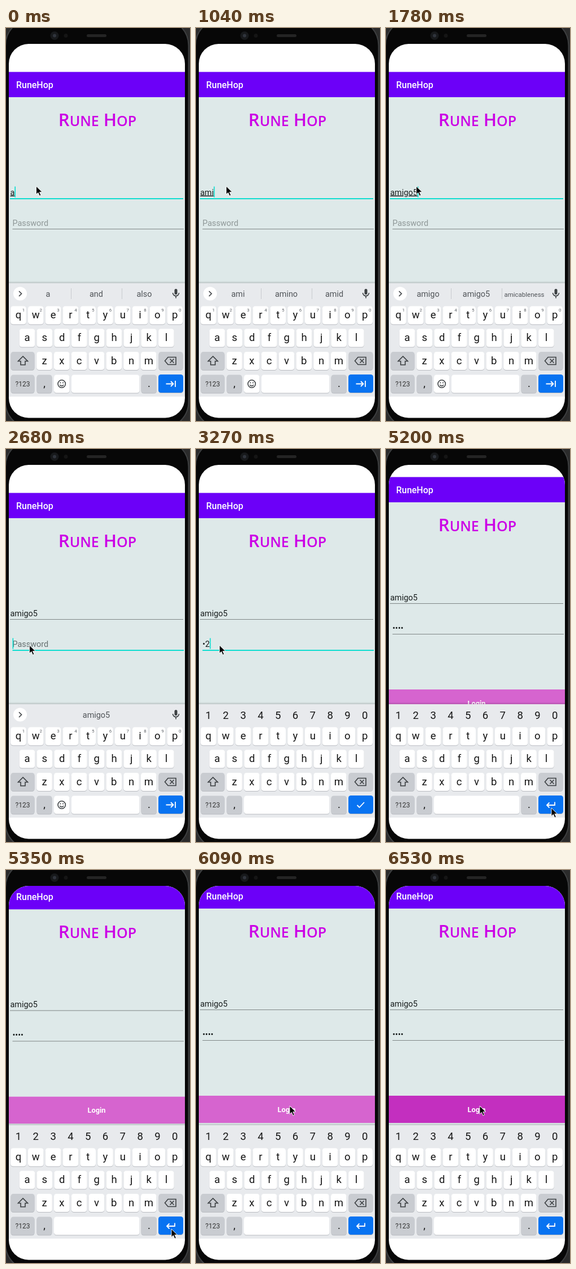
Animation of 326 by 693 pixels, one loop 8000 ms. Source, as an HTML page:

```html
<!DOCTYPE html>
<html lang="en">
<head>
<meta charset="utf-8">
<title>Phone login</title>
<style>
html, body { margin: 0; width: 100%; height: 100%; overflow: hidden; background: #2b2b2b; }
svg { display: block; width: 100%; height: 100%; }
text { font-family: Roboto, sans-serif; white-space: pre; }
.mid { text-anchor: middle; }
.field { font-size: 14.4px; fill: #161b1b; }
.key { font-size: 18.5px; fill: #151515; }
.hint { font-size: 8px; fill: #5f6368; }
.sug { font-size: 14.4px; fill: #505458; }
.title { font: 600 31px "Open Sans", sans-serif; fill: #cc00e6; }
.title .small { font-size: 25px; }
.icon { fill: none; stroke: #3c4043; stroke-width: 1.6; }
.white { stroke: #fff; stroke-width: 1.8; }
</style>
</head>
<body>
<svg viewBox="0 0 326 693">
  <defs>
    <clipPath id="screen"><rect x="5" y="28" width="312" height="659.500" rx="35"/></clipPath>
    <clipPath id="button"><rect x="5" y="452" width="312" height="48"/></clipPath>
    <linearGradient id="shade" x2="0" y2="1">
      <stop stop-color="#000" stop-opacity="0"/><stop offset="1" stop-color="#000" stop-opacity=".16"/>
    </linearGradient>
  </defs>
  <rect width="326" height="693" fill="#2b2b2b"/>
  <rect x="-1" y="-16" width="324.500" height="722" rx="47" fill="#070707" stroke="#3d3f40" stroke-width="2"/>
  <circle cx="86" cy="13.500" r="7.500" fill="#17191b"/>
  <circle cx="86" cy="13.500" r="3" fill="#30343c"/>
  <circle cx="106" cy="13.500" r="3.500" fill="#151515"/>
  <rect x="143" y="11" width="35" height="5" rx="2.500" fill="#242424"/>

  <g clip-path="url(#screen)">
    <rect x="5" y="28" width="312" height="660" fill="#fff"/>
    <g id="app">
      <rect x="5" y="77.500" width="312" height="500" fill="#dee9e9"/>
      <rect x="5" y="77.500" width="312" height="44.500" fill="#6c00f8"/>
      <text x="18" y="106" font-size="16" font-weight="500" fill="#fff">RuneHop</text>
      <text class="title mid" x="162" y="173">R<tspan class="small">UNE</tspan> H<tspan class="small">OP</tspan></text>
      <text id="user" class="field" x="7.500" y="294.500"></text>
      <rect id="userLine" x="7" width="307"/>
      <text id="pass" class="field" x="11.500" y="348.500"></text>
      <rect id="passLine" x="11.500" width="303.500"/>
      <rect id="caret" width="1.700" height="19" fill="#12ddd0"/>
      <g clip-path="url(#button)">
        <rect x="5" y="452" width="312" height="48" fill="#d664cf"/>
        <circle id="ripple" cx="167" cy="471" fill="#c32fbf"/>
      </g>
      <text class="mid" x="160.500" y="481" font-size="12.800" font-weight="700" fill="#fff">Login</text>
    </g>
    <rect x="5" y="446" width="312" height="4" fill="url(#shade)"/>
    <rect x="5" y="450" width="312" height="200" fill="#e8eaed"/>
    <g id="keys"></g>
    <g id="textMode">
      <circle cx="25" cy="468.500" r="12" fill="#fff"/>
      <path class="icon" d="M23 464l4.500 4.500-4.500 4.500"/>
      <g id="suggestions"></g>
      <rect x="298.500" y="460" width="5" height="10" rx="2.500" fill="#3c4043"/>
      <path class="icon" d="M295.500 467a5.500 5.500 0 0 0 11 0M301 473v3.500"/>
    </g>
    <g id="passMode"></g>
    <g id="action"></g>
  </g>
  <path id="mouse" d="M0 0v14.500l3.400-3.200 2.500 5.700 2.500-1.100-2.500-5.500h4.700z" fill="#000" stroke="#fff" stroke-width=".9"/>
</svg>
<script>
const $ = id => document.getElementById(id);
const LOOP = 8000, PITCH = 30.8, FOCUS = '#12ddd0', IDLE = '#7f8787';

const label = (x, y, s, cls, extra = '') => `<text class="mid ${cls}" x="${x}" y="${y}" ${extra}>${s}</text>`;
const icon = (d, cls = '') => `<path class="icon ${cls}" d="${d}"/>`;
const key = (x, y, w, fill = '#fff') =>
  `<rect x="${x}" y="${y + 1}" width="${w}" height="32" rx="4.5" fill="#b9bcc1"/>` +
  `<rect x="${x}" y="${y}" width="${w}" height="32" rx="4.5" fill="${fill}"/>`;
const letters = (row, x, y) => [...row].map((c, i) =>
  key(x + i * PITCH - 13.8, y, 27.6) + label(x + i * PITCH, y + 21.5, c, 'key')).join('');
const digits = (x, y, cls) => [...'1234567890'].map((c, i) => label(x + i * PITCH, y, c, cls)).join('');

const GRAY = '#c9ccd1';
$('keys').innerHTML =
  letters('qwertyuiop', 22, 490.5) + letters('asdfghjkl', 37.5, 530.5) + letters('zxcvbnm', 68, 571) +
  key(8.5, 571, 42, GRAY) + icon('M30 579l-8.500 8.500h4.500v6.500h8v-6.500h4.500z') +
  key(270.5, 571, 43, GRAY) + icon('M287 580.500h14v13h-14l-5.500-6.500zM290.500 583.500l7 7m0-7l-7 7') +
  key(8.5, 611.5, 42, GRAY) + label(29.5, 632, '?123', '', 'font-size="12" fill="#333"') +
  key(54.5, 611.5, 27, GRAY) + label(68, 633, ',', 'key') +
  key(239.5, 611.5, 27.5, GRAY) + label(253.5, 633, '.', 'key') +
  key(270, 611, 44, '#0873f1');
$('textMode').insertAdjacentHTML('beforeend',
  digits(31, 499.5, 'hint') + key(85, 611.5, 27.5) + key(116, 611.5, 120.5) +
  icon('M92 627.500a6.700 6.700 0 1 0 13.400 0a6.700 6.700 0 1 0-13.400 0M95.300 629.300q3.400 4 6.800 0M96.300 624.500v2M101.100 624.500v2'));
$('passMode').innerHTML = digits(22, 475.5, 'key') + key(85, 611.5, 151.5);

const ACTIONS = {
  next: 'M283.500 627.500h13m-4.500-4.500l4.500 4.500-4.500 4.500M300 622v11',
  done: 'M285.500 628l4 4 8.500-9',
  enter: 'M299 622.500v5.500h-14m4.500-4.500l-4.500 4.500 4.500 4.500'
};

// Each step changes only the listed parts of the state.
const STEPS = [
  [0, { user: 'a', pass: '', focus: 'user', caret: 1, words: ['a', 'and', 'also'], mode: 'text', action: 'next', pan: 0, ripple: 0, mouse: [53.5, 279] }],
  [150, { user: 'am' }],
  [300, { words: ['am', 'and', 'amp'] }],
  [890, { user: 'ami' }],
  [1040, { words: ['ami', 'amino', 'amid'] }],
  [1190, { user: 'amig' }],
  [1340, { user: 'amigo', words: ['amig', 'amigo', 'amigos'] }],
  [1480, { words: ['amigo', 'amigos', 'amiable'] }],
  [1630, { user: 'amigo5' }],
  [1780, { words: ['amigo', 'amigo5', 'amicableness'] }],
  [2080, { mouse: [53, 286] }],
  [2230, { mouse: [49, 308] }],
  [2380, { mouse: [43, 336] }],
  [2530, { mouse: [41.5, 346] }],
  [2680, { focus: 'pass', words: ['', 'amigo5', ''] }],
  [2820, { mode: 'pass', action: 'done' }],
  [3270, { pass: '•2' }],
  [3570, { pass: '••3' }],
  [3870, { pass: '•••4' }],
  [4320, { caret: 0 }],
  [4470, { mouse: [62, 376] }],
  [4610, { mouse: [150, 485] }],
  [4760, { mouse: [265, 612] }],
  [4910, { mouse: [314, 671] }],
  [5060, { mouse: [293, 633] }],
  [5200, { focus: '', pass: '••••', action: 'enter', pan: -28 }],
  [5350, { pan: -52.6 }],
  [5500, { pan: -54 }],
  [5650, { mouse: [275, 597] }],
  [5800, { mouse: [218, 500] }],
  [5940, { mouse: [174, 428] }],
  [6090, { mouse: [166, 416] }],
  [6230, { ripple: 45 }],
  [6380, { ripple: 110 }],
  [6530, { ripple: 180 }]
];

function set(id, attrs) {
  for (const name in attrs) $(id).setAttribute(name, attrs[name]);
}

function line(id, y, focused) {
  set(id, { y, height: focused ? 2 : 1, fill: focused ? FOCUS : IDLE });
}

function suggestions(words) {
  const dividers = words[0] ? '<path d="M115.500 459v19M205.500 459v19" stroke="#c8cbcf"/>' : '';
  return dividers + words.map((word, i) =>
    label([74.5, 160, 245][i], 474, word, 'sug', word.length > 10 ? 'style="font-size:11.5px"' : '')).join('');
}

function draw(s) {
  const onUser = s.focus === 'user', onPass = s.focus === 'pass';
  $('user').textContent = s.user;
  set('user', { 'text-decoration': onUser ? 'underline' : 'none' });
  $('pass').textContent = s.pass || 'Password';
  $('pass').style.fill = s.pass ? '#161b1b' : onPass ? '#667070' : '#8f9898';
  line('userLine', 300, onUser);
  line('passLine', 354, onPass);
  const end = onUser ? 7.5 + $('user').getComputedTextLength()
    : 11.5 + (s.pass ? $('pass').getComputedTextLength() : 0);
  set('caret', { x: end, y: onUser ? 279.5 : 333.5, opacity: s.focus ? s.caret : 0 });
  $('suggestions').innerHTML = suggestions(s.words);
  set('textMode', { display: s.mode === 'text' ? 'inline' : 'none' });
  set('passMode', { display: s.mode === 'pass' ? 'inline' : 'none' });
  $('action').innerHTML = icon(ACTIONS[s.action], 'white');
  set('app', { transform: `translate(0 ${s.pan})` });
  set('ripple', { r: s.ripple });
  set('mouse', { transform: `translate(${s.mouse})` });
}

let shown = 0;
function tick() {
  const t = performance.now() % LOOP;
  const past = STEPS.filter(([at]) => at <= t);
  if (past.length !== shown) {
    shown = past.length;
    draw(Object.assign({}, ...past.map(step => step[1])));
  }
  requestAnimationFrame(tick);
}
tick();
</script>
</body>
</html>
```
